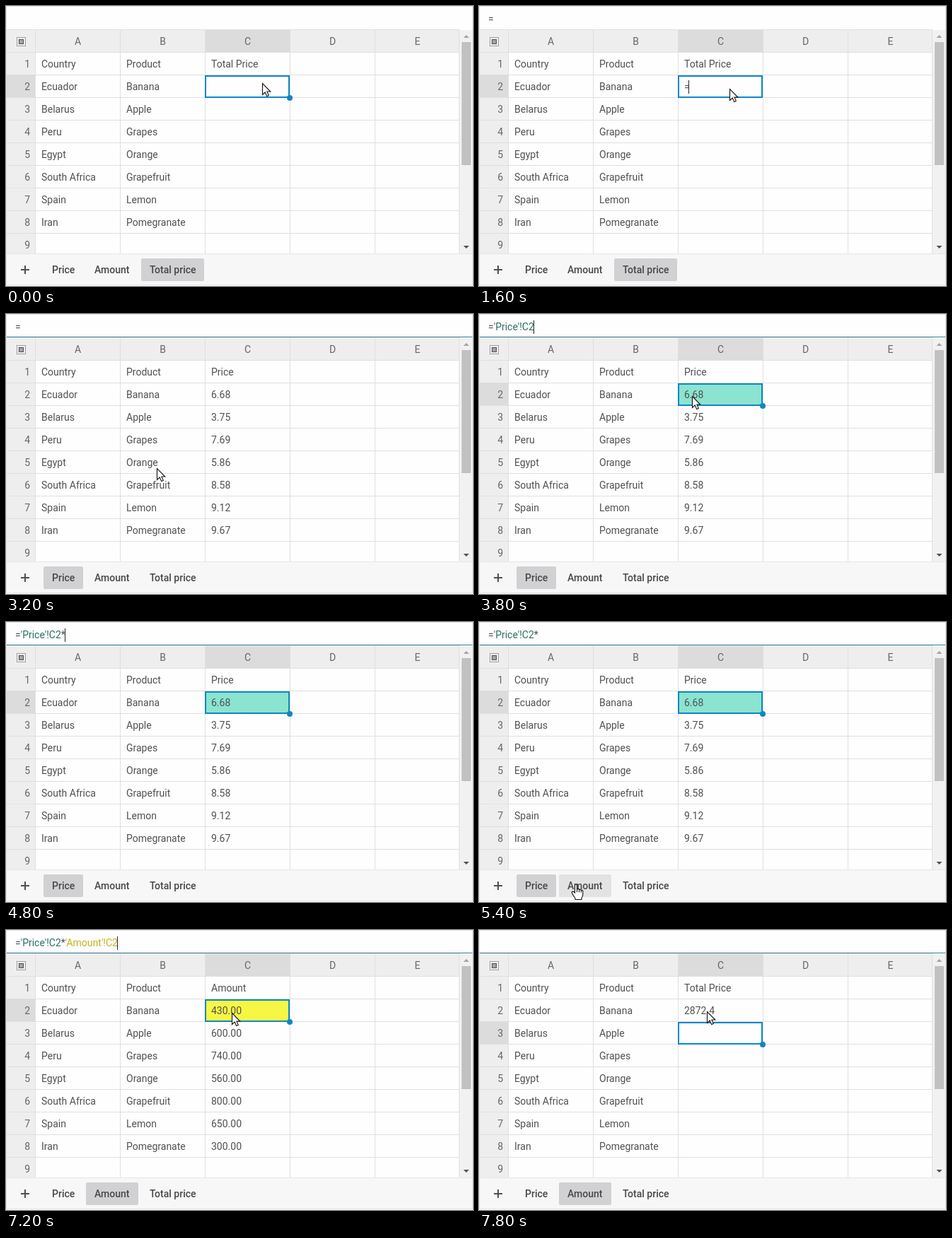
Animation of 660x396 px, one loop 8000 ms. Source, as an HTML page with a canvas:

```html
<!DOCTYPE html>
<html lang="en">
<head>
<meta charset="utf-8">
<title>Spreadsheet cross-sheet formula</title>
<style>
html, body { margin: 0; width: 660px; height: 396px; overflow: hidden; background: #fefefe; }
canvas { display: block; }
</style>
</head>
<body>
<canvas id="stage" width="660" height="396"></canvas>
<script>
const ctx = document.getElementById('stage').getContext('2d');
const LOOP = 8000;
const INK = '#505050', LINE = '#dfdfdf', BLUE = '#0d87c6', TEAL = '#2c6e63', OLIVE = '#c2b31c';

const countries = ['Country', 'Ecuador', 'Belarus', 'Peru', 'Egypt', 'South Africa', 'Spain', 'Iran'];
const products = ['Product', 'Banana', 'Apple', 'Grapes', 'Orange', 'Grapefruit', 'Lemon', 'Pomegranate'];
const price = ['Price', '6.68', '3.75', '7.69', '5.86', '8.58', '9.12', '9.67'];
const amount = ['Amount', '430.00', '600.00', '740.00', '560.00', '800.00', '650.00', '300.00'];
const tabs = [['Price', 53, 56], ['Amount', 113, 74], ['Total price', 191, 89]];

const eq = ['=', INK], priceRef = ["'Price'!C2", TEAL], star = ['*', INK], amountRef = ["'Amount'!C2", OLIVE];

// Each step changes only the named parts of the state.
const steps = [
  [0, { data: ['Total Price'], tab: 2, row: 2, formula: [], fill: null, edit: false, focus: false }],
  [1000, { formula: [eq], edit: true }],
  [2700, { data: price, tab: 0, row: 0, edit: false, focus: true }],
  [3550, { row: 2, fill: '#8be4cf', formula: [eq, priceRef] }],
  [4600, { formula: [eq, priceRef, star] }],
  [5720, { data: amount, tab: 1, row: 0, fill: null }],
  [6300, { row: 2, fill: '#f8f645', formula: [eq, priceRef, star, amountRef] }],
  [7400, { data: ['Total Price', '2872.4'], row: 3, fill: null, formula: [] }]
];
const caretStarts = [1150, 2700, 3550, 4600, 5720, 6190];

const route = [
  [0, 362, 109], [1500, 362, 109], [2500, 75, 376], [2800, 75, 376], [3500, 301, 116],
  [5050, 301, 116], [5380, 137, 371], [5720, 137, 371], [6150, 319, 117],
  [7400, 319, 117], [7700, 322, 115], [LOOP, 322, 115]
];
const hidden = t => (t >= 1000 && t < 1550) || (t >= 4600 && t < 5100);

function rect(x, y, w, h, color) {
  ctx.fillStyle = color;
  ctx.fillRect(x, y, w, h);
}

function text(s, x, y, color = INK, align = 'left', weight = 400) {
  ctx.font = `${weight} 14px Roboto, sans-serif`;
  ctx.textAlign = align;
  ctx.fillStyle = color;
  ctx.fillText(s, x, y);
  return x + ctx.measureText(s).width;
}

function triangle(x, y, dir, color) {
  ctx.fillStyle = color;
  ctx.beginPath();
  ctx.moveTo(x - 4, y + 2 * dir);
  ctx.lineTo(x + 4, y + 2 * dir);
  ctx.lineTo(x, y - 2 * dir);
  ctx.fill();
}

const rowTop = row => 34 + 32 * row;

function pointerAt(t) {
  const i = route.findIndex(p => p[0] > t);
  const [t0, x0, y0] = route[i - 1], [t1, x1, y1] = route[i];
  const p = (t - t0) / (t1 - t0), e = p * p * (3 - 2 * p);
  return [x0 + (x1 - x0) * e, y0 + (y1 - y0) * e];
}

function caretOn(t) {
  const start = caretStarts.filter(s => s <= t).pop() ?? 1000;
  return (t - start) % 1000 < 500;
}

function drawGrid(s) {
  rect(1, 34, 640, 32, '#eee');
  rect(1, 66, 41, 284, '#eee');
  if (s.row) {
    rect(282, 34, 119, 31, '#dcdcdc');
    rect(1, rowTop(s.row), 40, 31, '#dcdcdc');
  }
  if (s.fill) rect(282, rowTop(s.row), 119, 32, s.fill);
  for (let y = 33; y < 350; y += 32) rect(1, y, 640, 1, LINE);
  for (const x of [41, 161, 281, 401, 521, 640]) rect(x, 34, 1, 316, LINE);

  [...'ABCDE'].forEach((c, i) => text(c, 101.5 + 120 * i, 55, '#666', 'center'));
  for (let r = 1; r < 10; r++) text(r, 34, rowTop(r) + 21, '#666', 'right');
  [countries, products, s.data].forEach((column, c) =>
    column.forEach((v, r) => text(v, 50 + 120 * c, 87 + 32 * r)));

  // Select-all icon
  for (let i = 0; i < 13; i += 2) {
    for (const d of [0, 12]) {
      rect(15 + i, 44 + d, 1, 1, INK);
      rect(15 + d, 44 + i, 1, 1, INK);
    }
  }
  rect(18, 47, 7, 7, INK);
  rect(19, 48, 5, 5, '#a0a4ac');
}

function drawSelection(s, caret) {
  if (!s.row) return;
  const y = rowTop(s.row);
  ctx.strokeStyle = BLUE;
  ctx.lineWidth = 2;
  ctx.strokeRect(282, y + 1, 118, 30);
  if (s.edit) {
    const x = text('=', 290, y + 21);
    if (caret) rect(Math.floor(x - 1), y + 7, 1, 19, '#222');
  } else {
    ctx.fillStyle = BLUE;
    ctx.beginPath();
    ctx.arc(401, y + 32, 4, 0, 7);
    ctx.fill();
  }
}

function drawFormula(s, caret) {
  let x = 13;
  for (const [part, color] of s.formula) x = text(part, x, 23, color);
  if (!s.focus) return;
  rect(1, 32, 658, 1, '#2f7f98');
  if (caret && s.formula.length) rect(Math.floor(x), 9, 1, 19, '#222');
}

function drawScrollbar() {
  rect(641, 34, 18, 316, '#f1f1f1');
  rect(644, 51, 13, 174, '#c1c1c1');
  triangle(650.5, 43, 1, '#a3a3a3');
  triangle(650.5, 341, -1, '#505050');
}

function drawTabs(s, hover) {
  rect(1, 350, 658, 44, '#f7f7f7');
  rect(1, 350, 658, 1, '#e6e6e6');
  rect(21, 372, 12, 2, INK);
  rect(26, 367, 2, 12, INK);
  tabs.forEach(([label, x, w], i) => {
    if (i === s.tab || i === hover) {
      ctx.fillStyle = i === s.tab ? '#d1d1d3' : '#e3e3e4';
      ctx.beginPath();
      ctx.roundRect(x, 357, w, 32, 2);
      ctx.fill();
    }
    text(label, x + 12, 378, '#484848', 'left', 500);
  });
}

const arrow = new Path2D('M.5 .5V16.5L4.2 13L6.7 18.6L9.3 17.4L6.9 12H11.8Z');
const hand = new Path2D('M-1.5 12V1.5Q-1.5 0 0 0T1.5 1.5V7Q3.5 5.5 4.5 7.5Q6.5 6.5 7.3 8.5' +
  'Q9.8 7.8 9.8 10V14.5Q9.8 17 8 19V21.5H-1V19.5Q-3.5 16.5 -5.3 13Q-6.3 11 -5 10.3Q-3.5 9.7 -1.5 12Z');
const fingers = new Path2D('M1.5 7V11M4.5 7.8V11.2M7.3 8.8V11.5');

function drawPointer(x, y, isHand) {
  ctx.save();
  ctx.translate(Math.round(x), Math.round(y));
  ctx.lineWidth = 1.1;
  ctx.strokeStyle = '#111';
  ctx.fillStyle = '#fff';
  ctx.fill(isHand ? hand : arrow);
  ctx.stroke(isHand ? hand : arrow);
  if (isHand) ctx.stroke(fingers);
  ctx.restore();
}

function draw(now) {
  const t = now % LOOP;
  const s = Object.assign({}, ...steps.filter(p => p[0] <= t).map(p => p[1]));
  const [x, y] = pointerAt(t), caret = caretOn(t), visible = !hidden(t);
  const hover = visible && y >= 357 ? tabs.findIndex(([, left, w]) => x >= left && x <= left + w) : -1;

  rect(0, 0, 660, 396, '#fefefe');
  drawGrid(s);
  drawSelection(s, caret);
  drawScrollbar();
  drawTabs(s, hover);
  drawFormula(s, caret);
  ctx.lineWidth = 1;
  ctx.strokeStyle = '#e4e4e4';
  ctx.strokeRect(.5, .5, 659, 394);
  if (visible) drawPointer(x, y, hover >= 0);
}

const start = performance.now();
function tick() {
  draw(performance.now() - start);
  requestAnimationFrame(tick);
}
tick();
</script>
</body>
</html>
```
